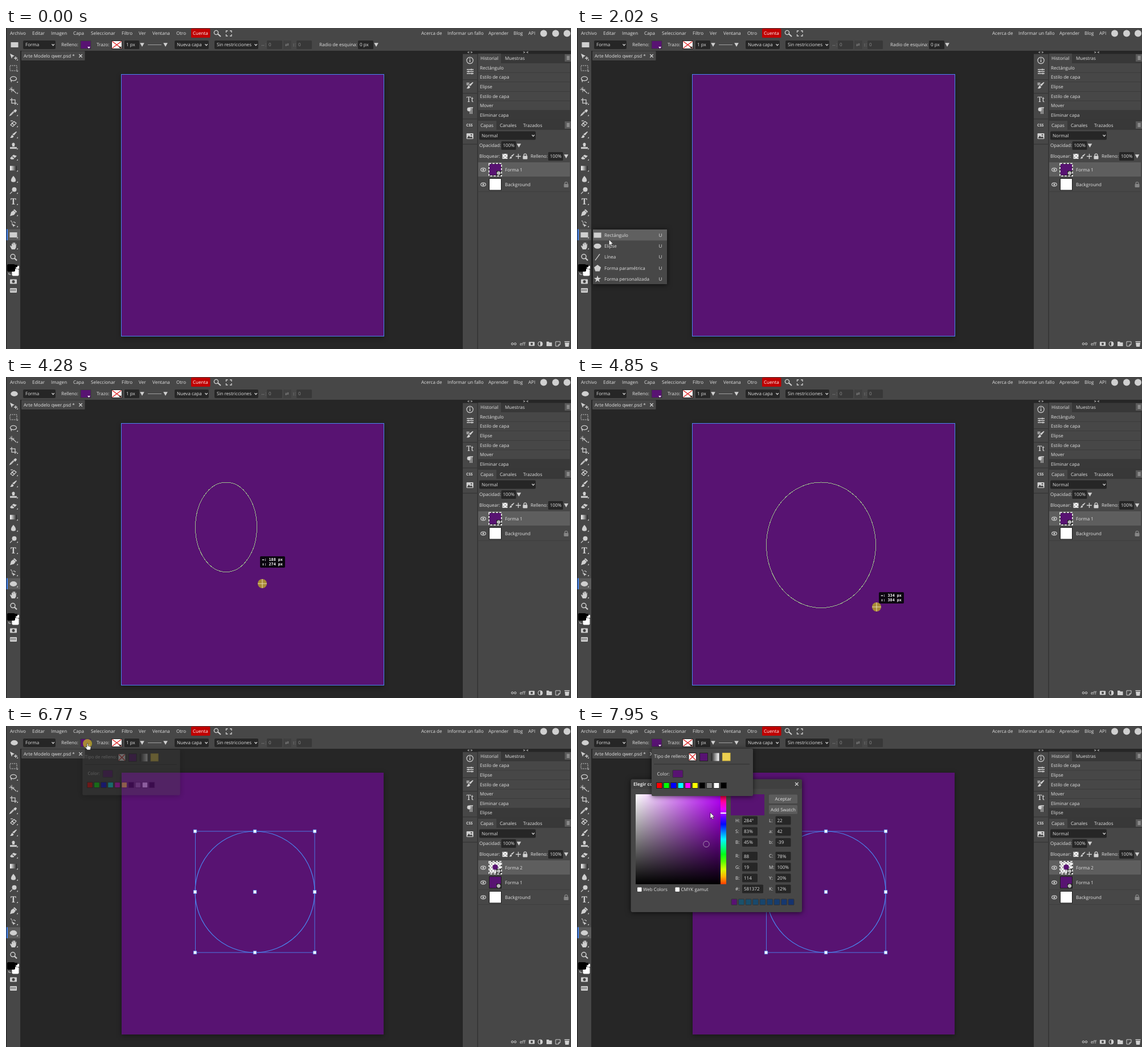
These frames come from a looping animation (992x564 px, 8 s). An HTML page:

```html
<!DOCTYPE html>
<html lang="es">
<head>
<meta charset="utf-8">
<title>Editor</title>
<style>
html, body { margin: 0; width: 100%; height: 100%; overflow: hidden; background: #262626; }
svg { display: block; width: 992px; height: 564px; }
text { font: 8.06px "Open Sans", sans-serif; fill: #e2e2e2; text-rendering: geometricPrecision; white-space: pre; }
.bold { font-weight: 700; }
.dim { fill: #8c8c8c; }
.tiny { font-size: 6.5px; font-weight: 700; }
.mono { font: 700 6.7px "DejaVu Sans Mono", monospace; fill: #fff; }
.line { fill: none; stroke: #d0d0d0; stroke-width: 1.3; }
.float { filter: drop-shadow(0 1px 5px #000a); }
.sheet { filter: drop-shadow(0 2px 5px #0006); }
</style>
</head>
<body>
<svg id="stage" viewBox="0 0 992 564"></svg>
<script>
const PURPLE = '#581372', PANEL = '#474747', GAP = '#383838', DARK = '#262626', ICON = '#d0d0d0', BLUE = '#4a86f0';

// Drawing helpers
const rect = (x, y, w, h, fill, more = '') => `<rect x="${x}" y="${y}" width="${w}" height="${h}" fill="${fill}" ${more}/>`;
const text = (x, y, s, cls = '', more = '') => `<text x="${x}" y="${y}" class="${cls}" ${more}>${s}</text>`;
const shape = (d, fill = ICON, more = '') => `<path d="${d}" fill="${fill}" ${more}/>`;
const line = (d, more = '') => `<path d="${d}" class="line" ${more}/>`;
const dot = (x, y, r, fill = ICON, more = '') => `<circle cx="${x}" cy="${y}" r="${r}" fill="${fill}" ${more}/>`;
const oval = (x, y, rx, ry, fill = ICON, more = '') => `<ellipse cx="${x}" cy="${y}" rx="${rx}" ry="${ry}" fill="${fill}" ${more}/>`;
const group = (id, body, more = '') => `<g id="${id}" ${more}>${body}</g>`;
const at = (x, y, body) => `<g transform="translate(${x} ${y})">${body}</g>`;
const tri = (x, y) => shape(`M${x - 3.8} ${y - 3.2}h7.6l-3.8 6.6z`);
const field = (x, y, w, s, h = 15) => rect(x, y, w, h, DARK, 'rx="1.5"') + text(x + 3, y + h / 2 + 2.9, s);
const select = (x, y, w, s, h = 15) => rect(x, y, w, h, DARK, 'rx="2"') + text(x + 4, y + h / 2 + 2.9, s)
  + line(`M${x + w - 6.5} ${y + h / 2 - 1.2}l2.2 2.4 2.2-2.4`);
const noFill = (x, y, w, h) => rect(x, y, w, h, '#fff', 'stroke="#222"')
  + line(`M${x + 1} ${y + 1}l${w - 2} ${h - 2}m0 ${2 - h}l${2 - w} ${h - 2}`, 'style="stroke:#d22"');
const cross = (x, y, r) => line(`M${x - r} ${y - r}l${2 * r} ${2 * r}m0 ${-2 * r}l${-2 * r} ${2 * r}`);
const menuIcon = y => rect(981, y, 11, 13, '#5a5a5a') + line(`M984.5 ${y + 4}h5m-5 2.5h5m-5 2.5h5`, 'style="stroke-width:1"');
const lock = (x, y) => rect(x - 4, y - 1, 8, 6, 'currentColor', 'rx="1"')
  + `<path d="M${x - 2.4} ${y}v-2a2.4 2.4 0 0 1 4.8 0v2" fill="none" stroke="currentColor" stroke-width="1.3"/>`;
const brush = shape('M5-6l1 1-5 6-3-2zM-2 0l2.5 2.5C0 5-3 6-6 5c2-1 2-4 4-5z');
const image = rect(-6, -5, 12, 10, ICON, 'rx="1"') + shape('M-5 4l3-5 2.5 3 2-2 2.5 4z', '#444') + dot(2.5, -2.3, 1.2, '#444');
const mask = rect(-6, -4, 12, 8, ICON, 'rx="1"') + dot(0, 0, 2.5, '#444');

const menuBar = () => {
  const items = { Archivo: 7, Editar: 46, Imagen: 79, Capa: 118, Seleccionar: 149, Filtro: 203, Ver: 233, Ventana: 257,
    Otro: 299, 'Acerca de': 729, 'Informar un fallo': 775, Aprender: 847, Blog: 891, API: 917 };
  return rect(0, 0, 992, 40, PANEL) + Object.entries(items).map(([s, x]) => text(x, 11.8, s)).join('')
    + rect(325, 1, 33.5, 16, '#c00000', 'rx="1.5"') + text(328, 11.8, 'Cuenta', '', 'style="fill:#fff"')
    + line('M372 10.5l5 4.5', 'style="stroke-width:2"') + dot(369, 8, 3.6, 'none', `stroke="${ICON}" stroke-width="1.4"`)
    + line('M386.5 8v-3h3m3.5 0h3v3m0 3v3h-3m-3.5 0h-3v-3')
    + [944, 965, 985].map(x => dot(x, 9.5, 6)).join('');
};

const optionBar = () => select(30, 22, 57, 'Forma') + text(97, 32, 'Relleno:')
  + rect(131, 22.5, 18, 14, PURPLE, 'stroke="#3b3b3b"') + shape('M143 33h5l-2.5 3z', '#fff')
  + text(159, 32, 'Trazo:') + noFill(185.5, 22.5, 18, 14) + shape('M198 33h5l-2.5 3z', '#111')
  + field(208, 22, 26, '1 px') + tri(239, 29.5) + line('M249 29.5h24', 'style="stroke:#a0a0a0;stroke-width:1"') + tri(280, 29.5)
  + select(296, 22, 60, 'Nueva capa') + select(366, 22, 77, 'Sin restricciones')
  + text(447, 32, '↔:', 'dim') + rect(458, 22, 27, 15, '#383838', 'rx="1.5"') + text(461, 32, '0', 'dim')
  + rect(487, 22, 14, 15, '#404040') + text(490, 32, '⇄', 'dim')
  + text(503, 32, '↕:', 'dim') + rect(510, 22, 27, 15, '#383838', 'rx="1.5"') + text(513, 32, '0', 'dim')
  + group('radius', text(550, 32, 'Radio de esquina:') + field(618, 22, 27, '0 px') + tri(650, 29.5));

const tools = () => {
  const icons = [
    shape('M-6-6l8 4-3.5 1.5-1.5 3.5z') + line('M1 2h6m-3-3v6'),
    rect(-6, -4.5, 12, 9, 'none', `stroke="${ICON}" stroke-dasharray="2 1.5"`),
    oval(0, -1, 5.5, 3.6, 'none', `stroke="${ICON}" stroke-width="1.3"`) + line('M-4 1c-2 2 2 2 0 4'),
    line('M-1-1l6 6') + line('M-3-6v9m-4.5-4.5h9m-7.5-3l6 6', 'style="stroke-width:1"'),
    line('M-3-6v9h9m-12-6h9v9'),
    shape('M2-5l2-1 2 2-1 2-2 2-3-3z') + line('M1-1l-5 5-2 1 1-2 5-5'),
    line('M-5 2l6-6 4 3-6 6zm2-4l5 5m-7-8h4'),
    brush,
    rect(-6, 2, 12, 3, ICON) + shape('M-2 1v-2c-3-6 7-6 4 0v2z'),
    shape('M-6 2l6-6 6 2-6 6h-4z') + line('M-2-1l4 3', 'style="stroke:#444"'),
    rect(-6, -4, 12, 8, 'url(#fade)', 'transform="scale(-1 1)"'),
    shape('M0-6c7 8 4 11 0 11s-7-3 0-11z'),
    dot(1.5, -1.5, 4) + line('M-2 2l-4 4'),
    `<text text-anchor="middle" y="5.5" style="font:bold 15px 'Noto Serif',serif;fill:${ICON}">T</text>`,
    shape('M-6 6l2-7 4-3 4 4-3 4zM2-6l4 4-1 2-5-5z'),
    line('M-5-5c3 0 3 4 3 8m2-6h3v3', 'stroke-dasharray="2 1"') + shape('M-2 0l6 3-3 1-1 2z'),
    '',
    shape('M-3 6l-3-6 1-1 2 2v-5h1.5v4l.5-6h1.5v5l1-5h1.5v5l1-3h1l-.5 7-2 3z'),
    dot(-1, -1, 4, 'none', `stroke="${ICON}" stroke-width="1.5"`) + line('M2 2l4 4', 'style="stroke-width:2.2"')
  ];
  return rect(0, 40, 25, 524, PANEL) + rect(0, 0, 1.2, 564, '#242424')
    + rect(1, 353.5, 24, 19.5, '#5c5c5c') + rect(1, 353.5, 2, 19.5, '#3d82f5')
    + icons.map((icon, i) => at(13, 51 + 19.53 * i, icon + (i < 18 ? shape('M8 3.5v2.5h-2.500z') : ''))).join('')
    + rect(10.5, 423.5, 12, 12, '#fff', 'rx="2"') + rect(2, 415, 14, 13, '#000', 'rx="2"')
    + line('M5 430v3h4', 'style="stroke-width:1"') + rect(18, 418, 5, 5, '#fff') + rect(16, 416, 4, 4, '#000')
    + at(13, 445.5, mask) + rect(7, 457, 12, 8, ICON, 'rx="1"') + line('M8 459.5h10m-10 2h10', 'style="stroke:#444" stroke-dasharray="1 1"');
};

const historyList = (id, y0, names) => group(id, names.map((s, i) =>
  rect(829, y0 + 16.6 * i, 161, 15.8, i === 5 ? '#393939' : PANEL) + text(832, y0 + 10.7 + 16.6 * i, s)).join(''), 'clip-path="url(#historyBox)"');

const layer = (y, name, kind, active) => rect(829, y, 161, 26, active ? '#5e5e5e' : PANEL) + rect(829, y + 25.4, 161, .6, '#3a3a3a')
  + oval(838, y + 13, 4.3, 2.8, 'none', `stroke="${ICON}" stroke-width="1.2"`) + dot(838, y + 13, 1.6)
  + rect(848.5, y + 2.5, 21, 20.5, { shape: PURPLE, round: 'url(#check)', plain: '#fff' }[kind], 'stroke="#1c1c1c"')
  + (kind === 'round' ? dot(859, y + 12, 4.8, PURPLE) : '')
  + (active ? rect(848, y + 2, 22, 22, 'none', 'stroke="#fff" stroke-width="1.5" stroke-dasharray="4 2"') : '')
  + (kind === 'plain' ? `<g color="#858585">${lock(983.5, y + 13)}</g>`
    : rect(861, y + 15, 8, 8, '#222') + rect(863, y + 17, 4, 4, 'none', 'stroke="#fff"') + line(`M865 ${y + 15.5}v7m-3.5-3.5h7`, 'style="stroke:#fff;stroke-width:.8"'))
  + text(876, y + 15.8, name);

const sidePanel = () => rect(802, 40, 190, 524, GAP) + rect(802, 40, 190, 5.5, DARK) + rect(802, 46, 25, 518, PANEL)
  + [90, 114, 159, 203.5].map(y => rect(802, y, 25, 1.5, GAP)).join('')
  + text(810, 44.5, '&lt; &gt;', 'tiny') + text(908, 44.5, '&gt; &lt;', 'tiny')
  + dot(814.5, 57, 5.6, 'none', `stroke="${ICON}" stroke-width="1.2"`) + rect(813.8, 56, 1.5, 4, ICON) + dot(814.5, 54, .9)
  + line('M809 73h12m-12 3.5h12m-12 3.5h12') + line('M817 71.5v3m-5 .5v3m6 .5v3')
  + at(814.5, 101, brush + line('M-6-4h5m-5 2.5h4'))
  + `<text x="808.5" y="130" style="font:13px 'Noto Serif',serif">Tt</text>`
  + line('M815 140v11m3-11v11m2-11h-6') + dot(813, 143, 3.4)
  + text(808, 172.5, 'CSS', 'tiny') + at(814.5, 190, image)
  + rect(829, 45, 40, 17, PANEL) + text(833, 55.8, 'Historial') + text(876, 55.8, 'Muestras') + menuIcon(46)
  + rect(829, 163, 32, 17, PANEL) + rect(829, 179, 163, 385, PANEL)
  + text(833, 173.8, 'Capas') + text(867, 173.8, 'Canales') + text(908, 173.8, 'Trazados') + menuIcon(164)
  + select(831, 181.5, 99, 'Normal') + text(831, 209.3, 'Opacidad:') + field(869.5, 199, 26, '100%') + tri(900.5, 206.5)
  + text(831, 228, 'Bloquear:') + rect(871.5, 221, 9, 9, 'url(#check)') + at(888, 225.5, `<g transform="scale(.75)">${brush}</g>`)
  + line('M899.5 221v9m-4.5-4.5h9') + `<g color="${ICON}">${lock(911.5, 225.5)}</g>`
  + text(921, 228, 'Relleno:') + field(952, 218, 26, '100%') + tri(983.5, 225.5)
  + historyList('historyBefore', 62, ['Rectángulo', 'Estilo de capa', 'Elipse', 'Estilo de capa', 'Mover', 'Eliminar capa'])
  + historyList('historyAfter', 61.6, ['Estilo de capa', 'Elipse', 'Estilo de capa', 'Mover', 'Eliminar capa', 'Elipse'])
  + group('layersBefore', layer(236, 'Forma 1', 'shape', true) + layer(262, 'Background', 'plain'))
  + group('layersAfter', layer(236, 'Forma 2', 'round', true) + layer(262, 'Forma 1', 'shape') + layer(288, 'Background', 'plain'))
  + dot(889, 555, 1.8, 'none', `stroke="${ICON}"`) + dot(894, 555, 1.8, 'none', `stroke="${ICON}"`) + text(902, 558, 'eff')
  + at(923, 555, `<g transform="scale(.85)">${mask}</g>`)
  + dot(938, 555, 4, 'none', `stroke="${ICON}"`) + shape('M938 551a4 4 0 0 1 0 8z')
  + shape('M949 551h4l1 1.5h4.5v6.5h-9.5z') + line('M965 551h8v5l-3 3h-5zm8 5h-3v3', 'style="stroke-width:1"')
  + shape('M981 553h8l-1 7h-6zm-.5-2.5h9v1.5h-9z');

const artwork = () => rect(203, 82, 460, 460, PURPLE, 'class="sheet"')
  + group('outline', rect(202.5, 81.5, 461, 460, 'none', `stroke="${BLUE}"`))
  + group('draft', oval(0, 0, 0, 0, 'none', 'stroke="#9cbd8c" shape-rendering="crispEdges"')
    + `<g>${rect(6, -27.5, 44, 20, '#0b0610', 'rx="2"')}${text(9.5, -19.2, '', 'mono')}${text(9.5, -11.2, '', 'mono')}</g>`)
  + group('selected', oval(437, 291.5, 105, 106.5, 'none', `stroke="${BLUE}" stroke-width="1.2"`)
    + rect(332.5, 185, 209.5, 213, 'none', `stroke="${BLUE}" stroke-width=".9"`)
    + [332, 437, 542].map(x => [185, 291.5, 398].map(y => rect(x - 2.8, y - 2.8, 5.6, 5.6, '#fff', `stroke="${BLUE}" stroke-width=".7"`)).join('')).join(''));

const toolMenu = () => {
  const names = ['Rectángulo', 'Elipse', 'Línea', 'Forma paramétrica', 'Forma personalizada'];
  const star = Array.from({ length: 10 }, (_, i) => {
    const r = i % 2 ? 2.6 : 6.5, a = i * Math.PI / 5;
    return `${r * Math.sin(a)} ${-r * Math.cos(a)}`;
  }).join('L');
  const icons = [rect(-6.5, -4.5, 13, 9, ICON), oval(0, 0, 6.5, 4.5), line('M-4 5.5l8-11'), shape('M0-6l6 4.5-2.3 7h-7.4l-2.3-7z'), shape(`M${star}z`)];
  return group('toolMenu', rect(28, 354, 130, 96, PANEL, 'class="float"') + rect(28, 354, 130, 19.3, '#606060', 'id="hover"')
    + names.map((s, i) => at(36, 364 + 19.3 * i, icons[i]) + text(48, 366.8 + 19.3 * i, s) + text(143.5, 366.8 + 19.3 * i, 'U')).join(''));
};

const fillPopup = () => group('popup', rect(131, 40, 178, 83, PANEL, 'rx="2" class="float"') + text(135.5, 56, 'Tipo de relleno:')
  + noFill(196, 47.5, 13.5, 13.5) + rect(215.5, 47.5, 14, 14, PURPLE, 'stroke="#222"')
  + rect(235.5, 47.5, 14, 14, 'url(#fade)') + rect(255.5, 47.5, 13.5, 13.5, '#ebcf51', 'stroke="#d6b93f"')
  + rect(135, 66.5, 168, 1, '#303030') + text(140.5, 86.5, 'Color:') + rect(168, 77.5, 18, 13, PURPLE, 'stroke="#333" rx="1"')
  + ['#f00', '#0f0', '#00f', '#0ff', '#f0f', '#ff0', '#000', '#808080', '#fff', '#000']
    .map((c, i) => rect(139.5 + 12.55 * i, 99.5, 10, 10, c, 'stroke="#222"')).join(''));

const colorDialog = () => {
  const rows = [['H', '284°', 'L', 22], ['S', '83%', 'a', 42], ['B', '45%', 'b', -39], ['R', 88, 'C', '78%'], ['G', 19, 'M', '100%'], ['B', 114, 'Y', '20%'], ['#', 581372, 'K', '12%']];
  return group('dialog', rect(94.5, 93.5, 300.5, 233.5, PANEL, 'rx="3" class="float"') + rect(95, 94, 300, 16.5, '#404040', 'rx="3"')
    + text(99, 105, 'Elegir color', 'bold') + cross(385.8, 102, 2.8)
    + rect(103, 120, 149, 158, 'url(#tint)') + rect(103, 120, 149, 158, 'url(#shade)') + rect(252, 120, 10, 158, 'url(#hue)')
    + rect(252, 152, 10, 2, '#fff') + dot(227, 207.5, 5.2, 'none', 'stroke="#a68bb0" stroke-width="1"')
    + rect(270, 120, 59, 37, PURPLE)
    + ['Aceptar', 'Add Swatch'].map((s, i) => rect(337, 120.5 + 18.5 * i, 50, 15.5, '#5c5c5c', 'rx="1.5"') + text(362, 131 + 18.5 * i, s, '', 'text-anchor="middle"')).join('')
    + rows.map(([a, b, c, d], i) => {
      const y = 166 + 19.2 * i + (i > 2 ? 5 : 0);
      return text(278, y + 2.8, a + ':') + field(290, y - 7.5, i === 6 ? 37 : 27, b) + text(337, y + 2.8, c + ':') + field(348.5, y - 7.5, 27, d);
    }).join('')
    + rect(106, 283.5, 7.5, 7.5, '#fff', 'rx="1"') + text(116, 289.7, 'Web Colors')
    + rect(172.5, 283.5, 7.5, 7.5, '#fff', 'rx="1"') + text(182.5, 289.7, 'CMYK gamut')
    + Array.from({ length: 9 }, (_, i) => rect(271 + 12.5 * i, 304, 10, 10.5, i ? `hsl(${196 + 3 * i} ${60 + i}% 26%)` : PURPLE, 'stroke="#333" rx="1"')).join(''));
};

const pointer = () => group('press', dot(0, 0, 8, '#c4b422', 'opacity=".74"'))
  + group('arrow', shape('M0 0v10.5l2.4-2.2 1.7 3.6 1.7-.8-1.7-3.4h3.3z', '#fff', 'stroke="#222" stroke-width=".7"'))
  + group('hand', shape('M-1 0q1.2-1.2 2 0v4l4 1q1.5.5 1 2l-1 4h-5.5l-3.5-5 1-1 2 1.5z', '#fff', 'stroke="#222" stroke-width=".7"'))
  + group('target', line('M-8 0h16m-8-8v16', 'style="stroke:#e9dcae;stroke-width:1"'));

const stops = list => list.map(([o, c, a = 1]) => `<stop offset="${o}" stop-color="${c}" stop-opacity="${a}"/>`).join('');
const gradient = (id, list, vertical) => `<linearGradient id="${id}" x2="${vertical ? 0 : 1}" y2="${vertical ? 1 : 0}">${stops(list)}</linearGradient>`;

const stage = document.getElementById('stage');
stage.innerHTML = '<defs>' + gradient('fade', [[0, '#222'], [1, '#fff']])
  + gradient('tint', [[0, '#fff'], [1, 'hsl(284 100% 50%)']]) + gradient('shade', [[0, '#000', 0], [1, '#000']], true)
  + gradient('hue', Array.from({ length: 13 }, (_, i) => [i / 12, `hsl(${350 - 28 * i} 100% 50%)`]), true)
  + `<pattern id="check" x="848" y="238" width="6" height="6" patternUnits="userSpaceOnUse">${rect(0, 0, 6, 6, '#fff')}${rect(0, 0, 3, 3, '#bbb')}${rect(3, 3, 3, 3, '#bbb')}</pattern>`
  + `<clipPath id="historyBox">${rect(829, 62, 163, 98.5, '#000')}</clipPath></defs>`
  + rect(0, 0, 992, 564, DARK) + artwork() + menuBar() + optionBar() + tools()
  + rect(27, 40.5, 111.5, 16.5, PANEL, 'rx="1"') + text(31, 51.5, 'Arte Modelo qwer.psd *') + cross(131, 49, 2.7)
  + sidePanel()
  + group('rectTool', rect(8.5, 25, 13, 9, ICON) + rect(6.5, 359, 13, 9, ICON))
  + group('ovalTool', oval(14.5, 29.5, 6.3, 4.4) + oval(13, 363.5, 6.3, 4.4))
  + toolMenu() + colorDialog() + fillPopup() + pointer();

const el = Object.fromEntries([...stage.querySelectorAll('[id]')].map(e => [e.id, e]));
const [draftOval, draftTag] = el.draft.children;
const [tagWidth, tagHeight] = draftTag.querySelectorAll('text');

// Bursts of screen updates: start, end, number of steps
const BURSTS = [[0, 0, 1], [130, 890, 11], [1070, 1070, 1], [1350, 2090, 10], [2160, 2370, 4], [2900, 3660, 12], [3860, 4640, 12],
  [4710, 5130, 7], [5530, 6090, 9], [6290, 7050, 11], [7180, 7330, 3], [7530, 7950, 7]];
// Pointer path: time, x, y
const PATH = [[0, 902, 600], [129, 902, 600], [130, 902, 549], [430, 520, 470], [700, 90, 382], [890, 14, 362], [1350, 14, 362], [2090, 62, 373],
  [2370, 83, 387], [2900, 83, 387], [3200, 190, 270], [3660, 331, 177], [3860, 331, 177], [3960, 332, 185], [4060, 360, 235],
  [4210, 440, 342.5], [4280, 450, 363], [4570, 503, 408], [4780, 524, 405.6], [4850, 526, 404], [5060, 542, 398], [5530, 542, 398],
  [5780, 330, 170], [6090, 147, 3], [6290, 147, 3], [6520, 143, 31], [6900, 143, 31], [7050, 171, 93], [7180, 171, 92],
  [7330, 172, 79], [7600, 172, 80], [7950, 234, 152], [8000, 234, 152]];

const snap = t => {
  const [start, end, n] = BURSTS.findLast(b => b[0] <= t);
  const tick = i => n > 1 ? Math.floor((start + (end - start) * i / (n - 1)) / 10) * 10 : start;
  let i = n - 1;
  while (i && tick(i) > t) i--;
  return tick(i);
};
const place = t => {
  const i = Math.max(1, PATH.findIndex(k => k[0] >= t));
  const [t0, x0, y0] = PATH[i - 1], [t1, x1, y1] = PATH[i], k = (t - t0) / (t1 - t0);
  return [x0 + (x1 - x0) * k, y0 + (y1 - y0) * k];
};
const ramp = (t, a, b) => Math.min(1, Math.max(0, (t - a) / (b - a)));
const show = (e, on) => { e.style.display = on ? '' : 'none'; };
const move = (e, x, y) => e.setAttribute('transform', `translate(${x} ${y})`);
const open = (e, k, cx, cy) => {
  show(e, k > 0);
  e.style.opacity = k;
  const s = .945 + .055 * k;
  e.setAttribute('transform', `translate(${cx * (1 - s)} ${cy * (1 - s)}) scale(${s})`);
};

// The drawn ellipse trails the pointer by one update
function drawDraft(t) {
  const [x, y] = place(t - 70), w = Math.max(0, x - 332), h = Math.max(0, y - 185);
  const size = { cx: 332.5 + w / 2, cy: 185 + h / 2, rx: w / 2, ry: h / 2 };
  for (const name in size) draftOval.setAttribute(name, size[name]);
  move(draftTag, x, y);
  tagWidth.textContent = `↔: ${Math.round(w / .5745)} px`;
  tagHeight.textContent = `↕: ${Math.round(h / .5745)} px`;
}

function render(time) {
  const t = snap(time), [x, y] = place(t), done = t >= 5530, ovalMode = t >= 2900;
  show(el.rectTool, !ovalMode);
  show(el.radius, !ovalMode);
  show(el.ovalTool, ovalMode);
  show(el.toolMenu, t >= 1070 && t < 2900);
  show(el.hover, x >= 28);
  el.hover.setAttribute('y', y < 374 ? 354 : 373.4);
  for (const name of ['outline', 'historyBefore', 'layersBefore']) show(el[name], !done);
  for (const name of ['selected', 'historyAfter', 'layersAfter']) show(el[name], done);
  const drawing = t >= 4040 && !done;
  show(el.draft, drawing);
  if (drawing) drawDraft(t);
  open(el.popup, ramp(t, 6670, 6890), 220, 81);
  open(el.dialog, ramp(t, 7590, 7790), 245, 210);

  const hand = (t >= 6400 && t < 6960) || (t >= 7250 && t < 7660);
  const target = t > 2900 && t < 6000 && y > 50;
  const pressed = (t >= 890 && t < 1350) || (t >= 2370 && t < 2900) || (t >= 3960 && !done) || (t >= 6590 && t < 6820) || (t >= 7530 && t < 7600);
  show(el.hand, hand);
  show(el.target, target);
  show(el.arrow, !hand && !target);
  show(el.press, pressed);
  for (const name of ['hand', 'target', 'arrow', 'press']) move(el[name], x, y);
}

const begin = performance.now();
function frame() {
  render((performance.now() - begin) % 8000);
  requestAnimationFrame(frame);
}
frame();
</script>
</body>
</html>
```
